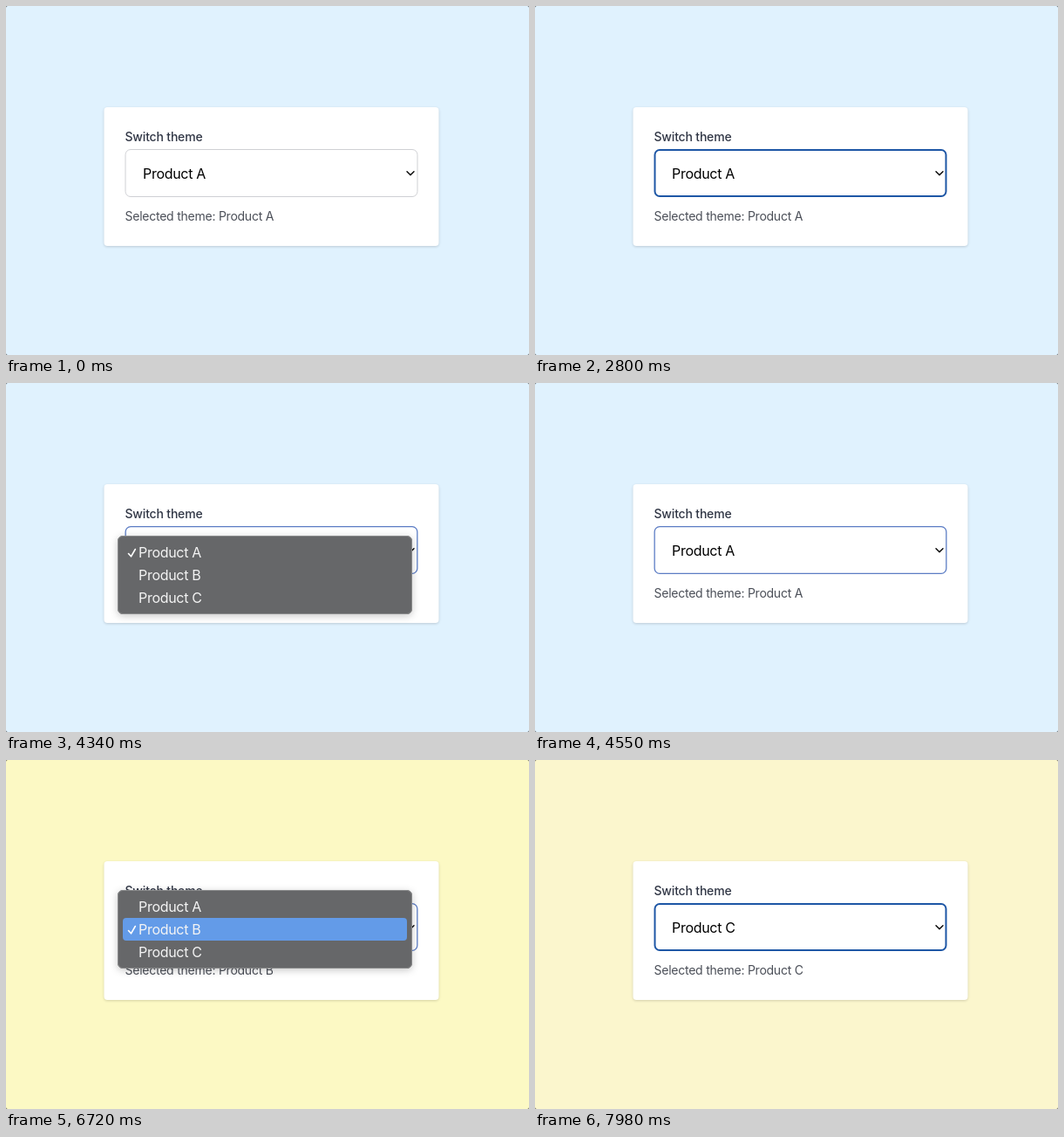
Write an HTML page that moves like this. It is 600 by 400 pixels and loops after 8000 ms.

```html
<!DOCTYPE html>
<html lang="en">
<head>
<meta charset="utf-8">
<title>Theme switcher</title>
<style>
  html, body { margin: 0; width: 100%; height: 100%; overflow: hidden; background: #555; }
  svg { display: block; width: 600px; height: 400px; border-radius: 2px; }
  text { font-family: Inter, "Liberation Sans", sans-serif; font-size: 14px; letter-spacing: -.24px; }
  .large { font-size: 16px; letter-spacing: -.3px; }
  .card { fill: #fff; filter: drop-shadow(0 1px 1.5px rgba(0, 0, 0, .16)); }
  .panel { fill: #666769; stroke: #88898a; filter: drop-shadow(0 0 .5px rgba(0, 0, 0, .5)) drop-shadow(0 2px 4px rgba(0, 0, 0, .22)); }
  .line { fill: none; stroke-linecap: round; stroke-linejoin: round; }
</style>
</head>
<body>
<svg id="stage" viewBox="0 0 600 400">
  <rect class="card" x="112.5" y="116" width="384" height="159" rx="4"/>
  <text x="136.5" y="155" fill="#303645" font-weight="500" style="letter-spacing:-.18px">Switch theme</text>
  <rect id="border" fill="#fff"/>
  <text id="value" class="large" x="157" y="197.5"></text>
  <path class="line" d="M460 189.7l4 4 4-4" stroke="#000" stroke-width="1.4"/>
  <text id="caption" x="136.5" y="246" fill="#4b4f58"></text>
  <g id="menu">
    <rect class="panel" x="128.5" y=".5" width="337" height="89" rx="5.5"/>
    <rect id="highlight" x="134" width="326" height="26" rx="4" fill="#639be8"/>
    <path id="check" class="line" d="M140.5 20.5l3 3.3 4.8-8.3" stroke="#fff" stroke-width="1.6"/>
  </g>
</svg>
<script>
const LOOP = 8000, STEP = 70, ROW = 26, FADE = 500;
const NAMES = ['Product A', 'Product B', 'Product C'];
const COLORS = [[224, 242, 254], [252, 249, 196], [243, 232, 255]];
const FOCUS = 1190;

// One visit to the menu: open, move the highlight, blink, fade out, refocus, apply.
const visits = [
  { from: 0, top: 175, open: 2870, move: 3640, blink: 4270 },
  { from: 1, top: 149, open: 6090, move: 6790, blink: 7490 }
].map(v => ({ ...v, fade: v.blink + 70, show: v.blink + 140, close: v.blink + 280,
              refocus: v.blink + 350, apply: v.blink + 385 }));

const el = id => document.getElementById(id);
const set = (node, attrs) => {
  for (const name in attrs) node.setAttribute(name, attrs[name]);
};

NAMES.forEach((name, i) => {
  const item = document.createElementNS('http://www.w3.org/2000/svg', 'text');
  set(item, { class: 'large', x: 152, y: 25 + i * ROW, fill: '#f4f4f4' });
  item.textContent = name;
  el('menu').append(item);
});

// cubic-bezier(.4, 0, .2, 1)
function ease(x) {
  if (x <= 0) return 0;
  if (x >= 1) return 1;
  let low = 0, high = 1;
  for (let i = 0; i < 24; i++) {
    const s = (low + high) / 2, r = 1 - s;
    if (1.2 * s * r * r + .6 * s * s * r + s ** 3 < x) low = s; else high = s;
  }
  return low * low * (3 - 2 * low);
}

function drawBorder(color, width) {
  const inset = width / 2;
  set(el('border'), { x: 136.5 + inset, y: 164 + inset, width: 336 - width, height: 55 - width,
                      rx: 6.5 - inset, stroke: color, 'stroke-width': width });
}

function drawMenu(visit, t) {
  el('menu').style.display = visit && t < visit.close ? '' : 'none';
  if (!visit) return;
  const opacity = t < visit.fade ? 1 : Math.max(0, 1 - (t - visit.fade) / (visit.close - visit.fade));
  set(el('menu'), { transform: `translate(0 ${visit.top})`,
                    opacity: t < visit.show ? 1 : opacity });
  const row = visit.from + (t >= visit.move);
  const hidden = t >= visit.blink && t < visit.show;
  set(el('highlight'), { y: 6 + row * ROW, opacity: hidden ? 0 : 1 });
  set(el('check'), { transform: `translate(0 ${visit.from * ROW})` });
}

function draw(time) {
  const t = Math.floor(time % LOOP / STEP) * STEP;

  let color = COLORS[0], selected = 0;
  for (const v of visits) {
    if (t < v.apply) break;
    selected = v.from + 1;
    const k = ease((t - v.apply) / FADE);
    color = color.map((c, i) => c + (COLORS[selected][i] - c) * k);
  }
  el('stage').style.background = `rgb(${color.map(Math.round)})`;
  el('value').textContent = NAMES[selected];
  el('caption').textContent = 'Selected theme: ' + NAMES[selected];

  const visit = visits.find(v => t >= v.open && t < v.refocus);
  if (t < FOCUS) drawBorder('#cfd0d4', 1);
  else if (visit) drawBorder('#5b7cc4', 1.3);
  else drawBorder('#1d56a5', 2);
  drawMenu(visit, t);
}

function tick() {
  draw(performance.now());
  requestAnimationFrame(tick);
}
tick();
</script>
</body>
</html>
```
